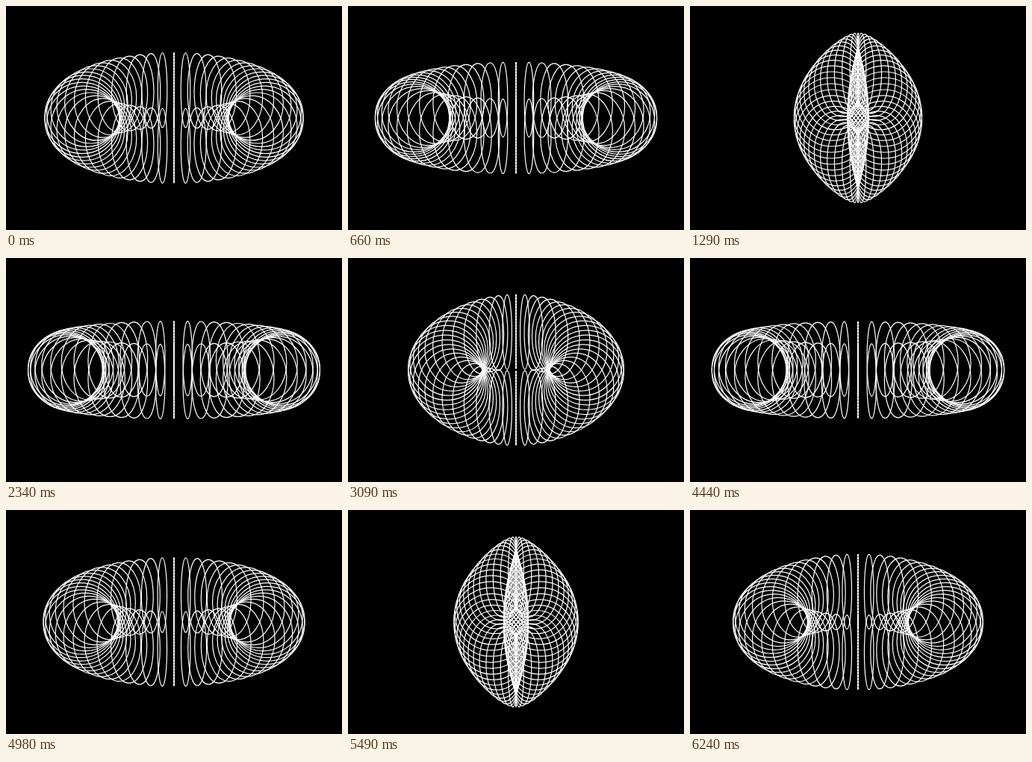
Write an HTML page with a canvas that moves like this. It is 450 by 300 pixels and loops after 6270 ms.

```html
<!DOCTYPE html>
<html lang="en">
<head>
<meta charset="utf-8">
<title>Ring torus</title>
<style>
  html, body { margin: 0; width: 100%; height: 100%; overflow: hidden; background: #000; }
  canvas { display: block; }
</style>
</head>
<body>
<canvas id="stage" width="450" height="300"></canvas>
<script>
const ctx = document.getElementById('stage').getContext('2d');

const CX = 225, CY = 150;
const RINGS = 50, RADIUS = 50;
const SPREAD_X = 150, SPREAD_Y = 66;
const STEP_MS = 30, STEPS = 209;
const START = -0.605, TURN = 0.045;

// A ring seen exactly edge-on: a faint bar with brighter dashes.
function edgeOn(y) {
  ctx.save();
  ctx.lineWidth = 2;
  ctx.beginPath();
  ctx.moveTo(CX, y - RADIUS);
  ctx.lineTo(CX, y + RADIUS);
  ctx.globalAlpha = 0.6;
  ctx.stroke();
  ctx.globalAlpha = 1;
  ctx.setLineDash([3, 1]);
  ctx.stroke();
  ctx.restore();
}

function ring(x, y, rx) {
  ctx.beginPath();
  ctx.ellipse(x, y, rx, RADIUS, 0, 0, 2 * Math.PI);
  ctx.stroke();
}

function draw(step) {
  const phase = START + TURN * step;
  const ax = SPREAD_X * Math.cos(phase);
  const ay = SPREAD_Y * Math.sin(phase);

  ctx.fillStyle = '#000';
  ctx.fillRect(0, 0, 450, 300);
  ctx.strokeStyle = '#fff';
  ctx.lineWidth = 1.2;

  for (let i = 0; i < RINGS; i++) {
    const a = 2 * Math.PI * i / RINGS;
    const side = Math.sin(a);
    const y = CY - ay * Math.cos(a);
    if (i % (RINGS / 2) === 0) edgeOn(y);
    else ring(CX + ax * side, y, RADIUS * Math.abs(side));
  }
}

const t0 = performance.now();
function tick() {
  const t = Math.max(0, performance.now() - t0);
  draw(Math.floor(t / STEP_MS) % STEPS);
  requestAnimationFrame(tick);
}
tick();
</script>
</body>
</html>
```
